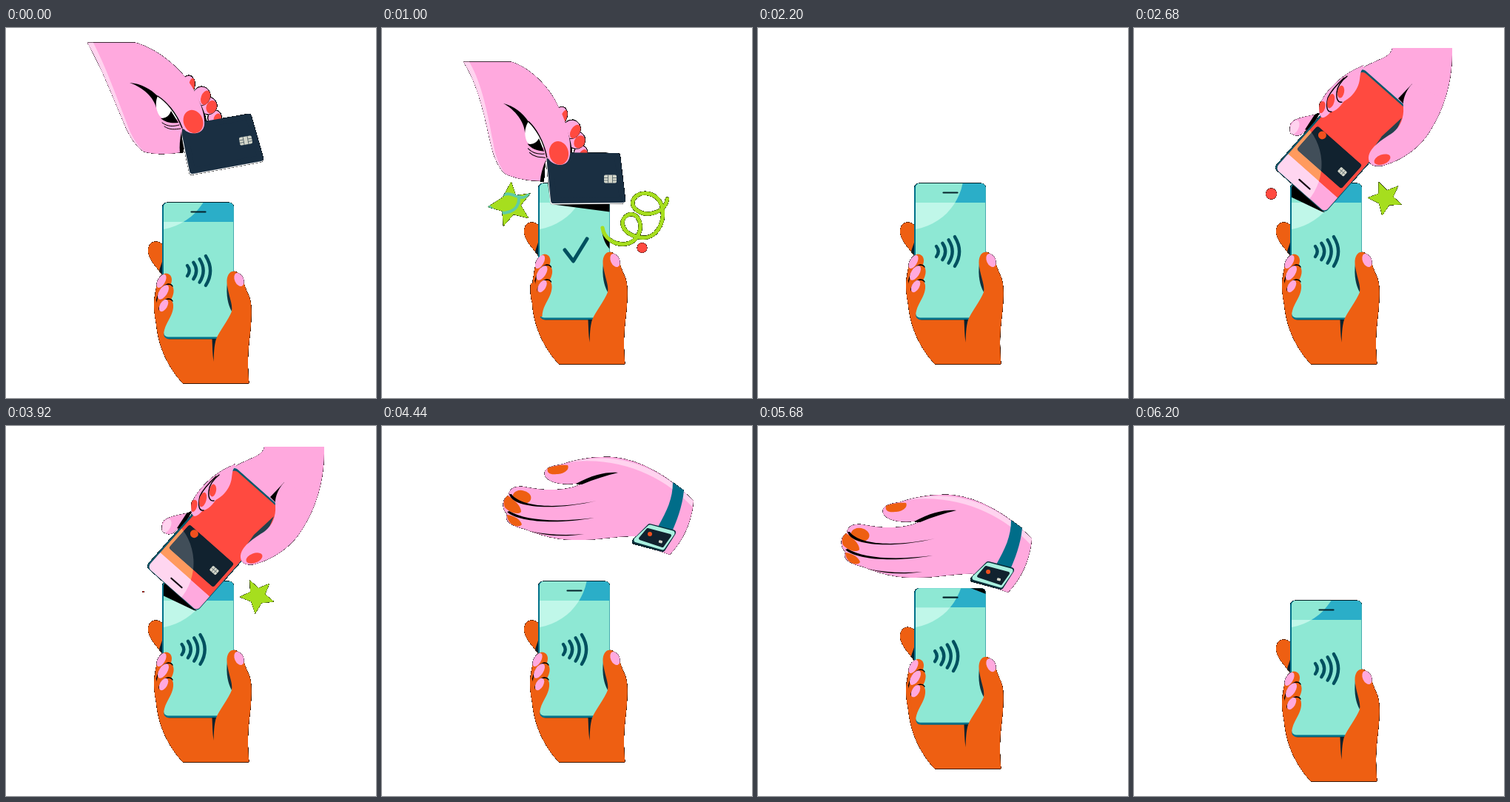
An HTML page that plays this animation: 500 by 500 pixels, repeating every 6.24 s.

```html
<!DOCTYPE html>
<html lang="en">
<head>
<meta charset="utf-8">
<title>Tap to pay</title>
<style>
html, body { margin: 0; width: 100%; height: 100%; overflow: hidden; background: #fff; }
svg { display: block; width: 100vw; height: 100vh; }
.pink { fill: #ffa9de; }
.pale { fill: #ffd3ef; }
.red { fill: #ff4a40; }
.orange { fill: #ee5f12; }
.lime { fill: #a6de1e; }
.navy { fill: #1a2f42; }
.line { fill: none; stroke: #000; stroke-width: 1.4; stroke-linecap: round; }
.ink { fill: none; stroke: #00505f; stroke-width: 4.4; stroke-linecap: round; stroke-linejoin: round; }
</style>
</head>
<body>
<svg viewBox="0 0 500 500">
  <defs>
    <!-- hard silhouette with a dark fringe -->
    <filter id="rim" filterUnits="userSpaceOnUse" x="0" y="0" width="500" height="500" color-interpolation-filters="sRGB">
      <feComponentTransfer in="SourceAlpha" result="dark"><feFuncA type="linear" slope="20" intercept="-2.500"/></feComponentTransfer>
      <feComposite in="SourceGraphic" in2="dark" operator="in" result="art"/>
      <feMerge><feMergeNode in="dark"/><feMergeNode in="art"/></feMerge>
    </filter>
    <clipPath id="screen"><rect x="213" y="210" width="94.500" height="181.500" rx="6"/></clipPath>
    <clipPath id="head"><rect x="213" y="210" width="95" height="26"/></clipPath>
    <clipPath id="redFront"><rect x="1" y="-177" width="89" height="177" rx="6"/></clipPath>
    <clipPath id="redHead"><rect x="0" y="-26" width="91" height="27"/></clipPath>
    <clipPath id="redCard"><rect x="5" y="-81" width="81" height="43" rx="4"/></clipPath>
  </defs>
  <g filter="url(#rim)">

  <!-- lower hand and phone -->
  <g id="phone">
    <path class="orange" d="M213 268C204 258 191 262 192 277C194 289 204 297 211 308L213 308Z"/>
    <path d="M212 287C210 293 208 298 207 302L212 309Z" fill="#06222e"/>
    <rect x="211" y="209.800" width="97" height="184.700" rx="7" fill="#00718a"/>
    <g clip-path="url(#screen)">
      <rect x="213" y="210" width="95" height="182" fill="#8ee8d4"/>
      <g class="still"><circle cx="200" cy="195" r="78" fill="#c0f7e9"/></g>
      <g clip-path="url(#head)">
        <rect x="213" y="210" width="95" height="26" fill="#2baec8"/>
        <g class="still"><circle cx="200" cy="195" r="78" fill="#8ee8d4"/></g>
      </g>
      <path d="M250.500 222.500H269.500" stroke="#05222b" stroke-width="2.200" stroke-linecap="round"/>
      <g class="still">
        <path id="cardShade" d="M222 195L322 195L312 249L228 238Z"/>
        <path id="redShade" d="M190 190L258 250L254 249L212 229Z"/>
        <path id="watchShade" d="M240 202L320 202L312 237L240 209Z"/>
        <path id="curlShade" d="M297 272C298 284 302 293 308 299L308 285Z"/>
      </g>
    </g>
    <g id="waves" class="ink"></g>
    <path id="check" class="ink" pathLength="1" d="M247 300L258.500 315L277 285" style="stroke-width:5"/>
    <path d="M299 318C297 335 300 348 305 357L309 345L304 326Z" fill="#12323f"/>
    <path d="M214 393.200H284" stroke="#00718a" stroke-width="2.200"/>
    <path class="orange" d="M328.500 454.200C325 415 329 400 331 375C333 350 331 340 326 331C321 318 318 308 312 304C304 300 298 307 298.500 318C300 335 307 347 305 357C301 368 288 384 284 394.500L221 394.500Q213 394.500 213 386L211 345L201 345C200 356 201 364 203 372C205 405 220 434 239 454.200Z"/>
    <path d="M278.500 394L284 394C281 404 281 415 280.500 425C279 414 279 404 278.500 394Z" fill="#06222e"/>
    <ellipse class="pink" cx="315" cy="314" rx="6" ry="9.500" transform="rotate(-24 315 314)"/>
    <g id="fingers">
      <path class="orange" d="M201 340C202 320 208 307 216 305.500C224 306 226 314 222 322L208 345Z"/>
      <ellipse class="pink" cx="210" cy="316" rx="5" ry="10" transform="rotate(30 210 316)"/>
      <path class="orange" d="M202 358C201 336 210 322 219 320C228 321 228 331 224 339L210 362Z"/>
      <path class="line" d="M203 346C204 334 211 322 219 320C222 320 224 321 225 323"/>
      <ellipse class="pink" cx="212.500" cy="331" rx="5.500" ry="11" transform="rotate(33 212.500 331)"/>
      <path class="orange" d="M203 376C202 355 210 341 219 340C228 341 227 353 224 360C220 370 213 378 213 390L209 390Z"/>
      <path class="line" d="M204 369C203 355 211 341 219 340C222 340 224 341 225 343"/>
      <ellipse class="pink" cx="213" cy="349" rx="5" ry="9" transform="rotate(30 213 349)"/>
      <path class="orange" d="M201 336C199 345 200 360 203.500 375L209 391L206 352Z"/>
    </g>
  </g>

  <!-- celebration bits -->
  <path id="curl" class="curl" pathLength="1" fill="none" stroke="#a6de1e" stroke-width="5.200" stroke-linecap="round" d="M298 270C300 285 315 293 328 292C346 290 354 270 346 257C338 246 324 254 325 265C327 278 345 285 358 283C375 279 383 258 378 240C372 221 347 218 339.500 232C335 244 350 252 362 251C375 249 384 242 385.500 231"/>
  <circle id="ballR" class="red" cx="351.500"/>
  <circle id="ballL" class="red" cx="185.500" cy="224"/>
  <g id="star1"></g>
  <g id="star2"></g>
  <g id="star3"></g>

  <!-- hand with card -->
  <g id="cardHand">
    <g class="turn" id="backFingers"></g>
    <path id="cardRim" fill="#fff" stroke="#fff" stroke-width="8" stroke-linejoin="round"/>
    <path id="cardFace" class="navy" stroke="#1a2f42" stroke-width="8" stroke-linejoin="round"/>
    <g id="chip">
      <rect x="-8.500" y="-5.500" width="17" height="11" rx="2" fill="#d3d6ca"/>
      <path d="M-8.500 -1.500H-3M-8.500 2H-3M3 -1.500H8.500M3 2H8.500M-3 -5.500V5.500M3 -5.500V5.500" stroke="#4a5a60" stroke-width=".8"/>
    </g>
    <path class="pink bent" d="M110 19.800L175 19.800C198 26 225 45 242 66C258 86 270 115 268 131C266 146 246 144 241 137L238 136L236 168C215 172 195 170 186 167C176 161 166 145 160 130C145 95 130 55 110 19.800Z"/>
    <path class="pale bent" d="M110 19.800L118 19.800C136 55 150 95 163 128C169 146 178 160 188 168C176 161 166 145 160 130C145 95 130 55 110 19.800Z"/>
    <g class="turn">
      <path d="M237 140L240 168L235 169C234 160 235 150 237 140Z"/>
      <path fill="#fff" d="M204 92C215 98 226 110 233 122C224 126 211 124 207 118C202 110 202 100 204 92Z"/>
      <path d="M167 74C185 80 200 94 203 108C202 100 204 94 205 92C195 82 182 75 167 74Z"/>
      <path d="M209 122C216 128 224 129 233 128L223 112C220 120 215 122 209 122Z"/>
      <path class="line" d="M205 92C216 99 230 114 238 135"/>
      <path class="line" style="stroke-width:1" d="M211 128C219 134 227 133 234 131M214 133C221 138 228 137 236 136"/>
      <ellipse class="red" cx="253" cy="126.500" rx="13" ry="16" transform="rotate(-22 253 126.500)"/>
    </g>
  </g>

  <!-- hand with red phone -->
  <g id="redHand">
    <path class="pink" d="M250 116C235 121 215 121 211 132C209 146 220 149 227 144L245 128Z"/>
    <ellipse class="pale" cx="217" cy="135" rx="5.500" ry="10" transform="rotate(25 217 135)"/>
    <path d="M251 115L244 118L231 138L238 140Z"/>
    <path class="pink" d="M349 27.900L430 27.900C431 75 418 112 400 140L355 150L300 62C318 44 347 44 349 27.900Z"/>
    <g transform="translate(190.500 190) rotate(41.500)">
      <rect x="-1.500" y="-179.500" width="92.500" height="180.500" rx="6" fill="#00596c"/>
      <g clip-path="url(#redFront)">
        <rect class="red" x="0" y="-178" width="92" height="178"/>
        <circle class="gleam" r="75" fill="#ff9a5e"/>
        <g clip-path="url(#redHead)">
          <rect class="pink" x="0" y="-26" width="92" height="27"/>
          <circle class="gleam" r="75" fill="#ffd6f0"/>
        </g>
        <g clip-path="url(#redCard)">
          <rect x="5" y="-81" width="81" height="43" fill="#11222f"/>
          <circle class="gleam" r="75" fill="#fff" opacity=".2"/>
        </g>
        <circle cx="18.500" cy="-75.500" r="5.500" fill="#f0501e"/>
        <rect x="66" y="-60.500" width="11" height="8" rx="1.500" fill="#d3d6ca"/>
        <path d="M66 -56.500H77M70 -60.500V-52.500M73.500 -60.500V-52.500" stroke="#4a5a60" stroke-width=".7"/>
        <path d="M35 -10H54" stroke="#120810" stroke-width="2.200" stroke-linecap="round"/>
      </g>
    </g>
    <path d="M376 76L357 96L365 104Z"/>
    <path d="M362 122L335 147L325 161L352 146Z" fill="#23414c"/>
    <path class="pink" d="M375 77C366 88 363 98 364 108C365 122 360 134 350 142C335 152 316 163 317 178C318 188 328 188 336 187C360 180 385 165 400 140L418 95Z"/>
    <ellipse class="red" cx="335.500" cy="178.500" rx="11.500" ry="6.500" transform="rotate(-20 335.500 178.500)"/>
    <path class="pink" d="M310 52C285 60 262 82 253 100C248 112 250 121 255 122C262 121 268 112 273 102L300 70Z"/>
    <path class="red" d="M251 102C256 97 260 101 258 109C256 116 252 117 251 115C250 110 250 106 251 102Z"/>
    <path class="pink" d="M306 54C282 64 268 80 262 95C259 108 261 115 267 114C276 112 283 101 290 90Z"/>
    <path class="line" d="M284 68C271 80 265 88 262 95C259 108 261 115 267 114"/>
    <ellipse class="red" cx="266" cy="99.500" rx="4.700" ry="10" transform="rotate(15 266 99.500)"/>
    <path class="pink" d="M310 51C288 62 276 74 274 86C273 97 276 102 281 101C291 97 303 86 305 70C306 63 306 58 310 55Z"/>
    <path class="line" d="M288 66C279 73 275 79 274 88C273 97 276 102 281 101"/>
    <ellipse class="red" cx="279.500" cy="87" rx="4.500" ry="8.500" transform="rotate(10 279.500 87)"/>
  </g>

  <!-- hand with watch -->
  <g id="watchHand">
    <path class="pink" d="M163 124C160 114 172 111 185 109C215 99 245 97 262 100C302 106 338 132 364 158C362 186 350 212 332 231L306 222L285 206C262 205 235 212 200 211C170 210 148 201 135 196C118 192 108 186 112 176C105 170 104 156 114 151C115 139 126 137 140 140C165 145 200 145 218 132C195 139 167 135 163 124Z"/>
    <path class="pale" d="M195 106C240 95 300 95 364 158L362 166C325 126 265 97 195 106Z"/>
    <path d="M205 135C228 123 245 119 262 120C245 124 230 129 213 136Z"/>
    <g class="orange">
      <path d="M167 114C174 111 185 109 194 110C197 116 189 122 179 122C171 123 165 121 167 114Z"/>
      <ellipse cx="132" cy="153" rx="12.500" ry="9" transform="rotate(10 132 153)"/>
      <path d="M113 151C122 157 131 165 131 173C127 178 114 173 109 167C106 161 108 155 113 151Z"/>
      <path d="M112 177C121 178 130 183 132 190C128 196 112 191 112 177Z"/>
    </g>
    <path d="M115 149C119 168 175 172 233 158C175 170 130 166 118 149Z"/>
    <path d="M112 173C125 186 175 191 230 181C175 188 135 184 115 172Z"/>
    <path d="M143 199C165 206 190 207 216 203C190 205 165 204 143 199Z"/>
    <path d="M336 133L351 144C349 166 341 186 334 202L316 193C328 172 336 155 336 133Z" fill="#006d89"/>
    <path d="M305 193L336 201L322 223L285 213Z" fill="#062c38" stroke="#062c38" stroke-width="8" stroke-linejoin="round"/>
    <path d="M305 194L335 202L322 221L287 211Z" fill="#a9f0df" stroke="#a9f0df" stroke-width="7" stroke-linejoin="round"/>
    <path d="M302 197L332 205L322 219L292 209Z" fill="#11222f" stroke="#11222f" stroke-width="4" stroke-linejoin="round"/>
    <circle cx="305" cy="203" r="3" fill="#f0501e"/>
    <rect x="317" y="211.500" width="5" height="3.500" rx="1" fill="#d3d6ca" transform="rotate(15 319 213)"/>
  </g>
  </g>
</svg>
<script>
const LOOP = 6240, STEP = 40;
const $ = id => document.getElementById(id);
const all = (sel, fn) => document.querySelectorAll(sel).forEach(fn);
const set = (el, name, value) => el.setAttribute(name, value);
const show = (id, on) => { $(id).style.display = on ? '' : 'none'; };
const move = (id, x, y) => set($(id), 'transform', `translate(${x} ${y})`);
const smooth = p => p * p * (3 - 2 * p);
const mix = (a, b, p) => a + (b - a) * p;

// Eased value from [time, value] steps.
function track(t, ...steps) {
  if (t <= steps[0][0]) return steps[0][1];
  for (let i = 1; i < steps.length; i++) {
    const [t0, a] = steps[i - 1], [t1, b] = steps[i];
    if (t < t1) return mix(a, b, smooth((t - t0) / (t1 - t0)));
  }
  return steps[steps.length - 1][1];
}
// Grow during a..b, hold, then shrink during c..d.
const pulse = (t, a, b, c, d) => track(t, [a, 0], [b, 1], [c, 1], [d, 0]);

const polar = (r, deg) => [r * Math.cos(deg * Math.PI / 180), r * Math.sin(deg * Math.PI / 180)];
function starPath(r, angles) {
  const points = angles.flatMap((a, i) => {
    const next = i < 4 ? angles[i + 1] : angles[0] + 360;
    return [polar(r, a), polar(r * .46, (a + next) / 2)];
  });
  return 'M' + points.map(p => p.map(v => v.toFixed(1)).join(' ')).join('L') + 'Z';
}
function makeStar(id, r, angles, swirl) {
  const d = starPath(r, angles), lines = 'M6 -22C16 -8 12 8 -6 11C-16 12 -24 8 -30 2M-16 -8C-8 -18 2 -14 12 -10C18 -8 24 -12 28 -18';
  $(id).innerHTML = `<path class="lime" d="${d}"/>` + (swirl
    ? `<clipPath id="${id}Clip"><path d="${d}"/></clipPath>
       <path clip-path="url(#${id}Clip)" d="${lines}" fill="none" stroke="#5fcba6" stroke-width="4"/>` : '');
}
makeStar('star1', 31, [-88, -29, 37, 108, 174], true);
makeStar('star2', 24, [-112, -43, 21, 100, 181], false);
makeStar('star3', 31, [-122, -47, 11, 106, 164], true);

function putStar(id, x, y, size, turn) {
  show(id, size > .02);
  set($(id), 'transform', `translate(${x} ${y}) rotate(${turn}) scale(${size})`);
}

$('waves').innerHTML = [0, 1, 2, 3].map(i => {
  const x = 245 + 8.300 * i, h = 7 + 4.300 * i, bulge = 5.500 + 2.300 * i;
  return `<path d="M${x} ${302 - h}q${bulge} ${h} 0 ${2 * h}"/>`;
}).join('');

// Each finger: centre, radii, tilt, nail offset.
$('backFingers').innerHTML = [
  [282, 121, 9, 10, 20, 4], [273, 105, 12, 12, 20, 5], [264, 92, 12, 13, 20, 6], [246, 77, 9, 13, 8, 5]
].map(([x, y, rx, ry, tilt, nail]) =>
  `<g transform="translate(${x} ${y}) rotate(${tilt})">
     <ellipse class="pink" rx="${rx}" ry="${ry}" stroke="#000" stroke-width=".8"/>
     <ellipse class="red" cx="${nail}" rx="${rx - nail}" ry="${ry - 3}"/>
   </g>`).join('') + '<path d="M238 66C255 86 271 112 271 130L262 130L240 80Z"/>';

// The circle that the slanted phone catches, in its own axes.
all('.gleam', el => { set(el, 'cx', -12.300); set(el, 'cy', 4.200); });

const BEND = 10.300;
const bentParts = [...document.querySelectorAll('.bent')].map(el => [el, el.getAttribute('d')]);
// Swings the hand about the wrist while the cut end stays put.
function bend(d, k) {
  return d.replace(/(-?[\d.]+) (-?[\d.]+)/g, (_, sx, sy) => {
    const x = sx - 155, y = sy - 57;
    const a = k * BEND * Math.PI / 180 * Math.min(1, Math.max(0, (sy - 20) / 45));
    const c = Math.cos(a), s = Math.sin(a);
    return `${(155 + x * c - y * s).toFixed(2)} ${(57 + x * s + y * c).toFixed(2)}`;
  });
}
const cardUp = [[240, 135], [328, 120], [344, 176], [252, 193]];
const cardDown = [[226, 146], [318, 147], [325, 206], [232, 207]];

function drawCardHand(t) {
  show('cardHand', t < 2160);
  show('cardShade', t < 2160);
  const y = track(t, [0, 0], [660, 26], [1840, 26], [2200, -10]);
  const k = track(t, [0, 0], [660, 1], [1840, 1], [2200, 0]);
  move('cardHand', 0, y);
  move('cardShade', 0, y - 26);
  for (const [el, d] of bentParts) set(el, 'd', bend(d, k));
  all('.turn', el => set(el, 'transform', `rotate(${k * BEND} 155 57)`));
  const quad = cardUp.map((p, i) => p.map((v, j) => mix(v, cardDown[i][j], k)).join(' '));
  const d = 'M' + quad.join('L') + 'Z';
  set($('cardFace'), 'd', d);
  set($('cardRim'), 'd', d);
  move('cardRim', -.8, 1.500);
  set($('chip'), 'transform', `translate(${mix(324, 308.500, k)} ${mix(152, 178, k)}) rotate(${mix(-10, 0, k)})`);
}

function drawRedHand(t) {
  const on = t >= 2240 && t < 4440;
  const y = track(t, [2240, -18], [2560, -15], [2700, 0], [3000, 1], [3840, 1], [3920, 0], [4440, -16]);
  for (const id of ['redHand', 'redShade']) {
    show(id, on);
    move(id, 0, y);
  }
}

function drawWatchHand(t) {
  const on = t >= 4440 && t < 5960;
  const d = track(t, [4480, 57], [4840, 0], [5560, 0], [6160, 58]);
  for (const id of ['watchHand', 'watchShade']) {
    show(id, on);
    move(id, d, -d);
  }
}

function drawPhone(t) {
  const y = track(t, [0, 26], [660, 0], [5440, 0], [6040, 26]);
  move('phone', 0, y);
  all('.still', el => set(el, 'transform', `translate(0 ${-y})`));
  move('fingers', 3.500 * pulse(t, 500, 720, 1400, 1700), 0);

  const shown = [[720, 2080], [2720, 3880], [4840, 5600]];
  const now = shown.find(([a, b]) => t >= a && t < b);
  show('check', now);
  show('waves', !now);
  if (now) {
    const p = track(t, [now[0] - 40, 0], [now[0] + 180, 1]);
    set($('check'), 'stroke-dasharray', `${p} 2`);
  } else {
    const back = shown.filter(s => t >= s[1]).pop();
    move('waves', back ? track(t, [back[1], -8], [back[1] + 240, 0]) : 0, 0);
  }
}

function drawBits(t) {
  const first = t < 3000;
  const head = first ? track(t, [760, 0], [980, 1]) : track(t, [4840, 0], [5070, 1]);
  const tail = first ? track(t, [1500, 0], [1740, 1]) : track(t, [5360, 0], [5600, 1]);
  const on = head - tail > .01;
  show('curl', on);
  show('curlShade', on && tail < .3);
  set($('curl'), 'stroke-dasharray', `${Math.max(0, head - tail)} 3`);
  set($('curl'), 'stroke-dashoffset', -tail);

  const right = first ? pulse(t, 760, 920, 1560, 1760) : pulse(t, 4860, 5000, 5400, 5600);
  const left = track(t, [2580, 0], [2680, 7.500], [2760, 9], [2880, 7.500], [3720, 7.500], [3980, 0]);
  set($('ballR'), 'cy', first ? 297 : 303.500);
  set($('ballR'), 'r', 6.800 * right);
  set($('ballL'), 'r', left);

  putStar('star1', 173.500, 238.500, pulse(t, 720, 900, 1560, 1760), (t - 1000) / 60);
  putStar('star2', 339.500, 230, pulse(t, 2580, 2680, 4000, 4160), (2680 - t) / 400);
  putStar('star3', 165, 246, pulse(t, 4820, 4980, 5400, 5600), (t - 5040) / 60);
}

const start = performance.now();
function frame() {
  const t = Math.floor((performance.now() - start) % LOOP / STEP) * STEP;
  drawPhone(t);
  drawBits(t);
  drawCardHand(t);
  drawRedHand(t);
  drawWatchHand(t);
  requestAnimationFrame(frame);
}
frame();
</script>
</body>
</html>
```
